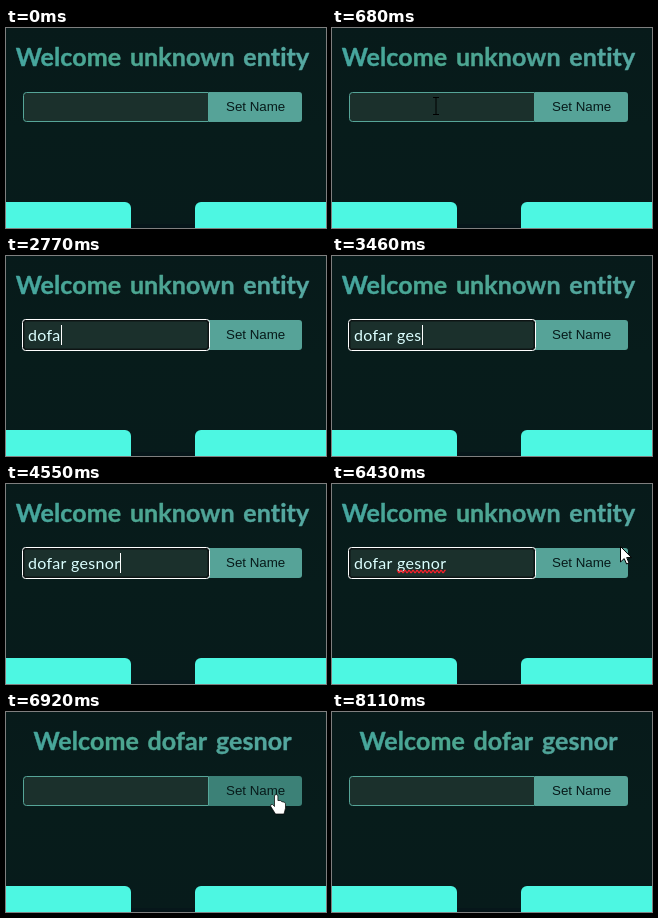
An HTML page with a canvas for the animation above (9.09 s loop, 320 by 200 pixels).

```html
<!DOCTYPE html>
<html lang="en">
<head>
<meta charset="utf-8">
<title>Set Name</title>
<style>
html, body { margin: 0; width: 100%; height: 100%; overflow: hidden; background: #071a1a; }
canvas { display: block; }
</style>
</head>
<body>
<canvas id="stage" width="320" height="200"></canvas>
<script>
const ctx = document.getElementById('stage').getContext('2d');
const LOOP = 9090;
const NAME = 'dofar gesnor';

const keyTimes = [1880, 2180, 2470, 2770, 2970, 3160, 3260, 3360, 3460, 4150, 4350, 4550];
const caretOff = [[1280, 1780], [3950, 4150], [5040, 5540], [6130, 6620]];
const FOCUS = 780, SPELLCHECK = 5540, HOVER = 6520, PRESS = 6820, SUBMIT = 6920, LEAVE = 8110;

// Pointer poses: start time, shape, hotspot x, y
const pointer = [
  [0, null],
  [190, 'arrow', 266, 115], [290, 'arrow', 226, 103], [390, 'beam', 178, 84],
  [490, 'arrow', 132, 48], [580, 'beam', 112, 70], [680, 'beam', 104, 78],
  [880, null],
  [6330, 'arrow', 299, 53], [6430, 'arrow', 288, 62], [6520, 'hand', 275, 76],
  [6620, 'hand', 270, 81], [6820, 'hand', 270, 82], [8010, 'hand', 271, 88],
  [8110, null]
];

const shapes = {
  arrow: new Path2D('M.5 .5V16L4.2 12.6 6.6 18 9 17 6.7 11.6H11.5Z'),
  hand: new Path2D('M-1.5 2q0-1.5 1.7-1.5t1.7 1.5v4.5q3-.5 4 1.2 3.2 0 3.6 2v4.5l-1.5 5.8h-8.5l-5-8q0-2 2-1.5l2 2z'),
  beam: new Path2D('M-3-8.5H3M0-8.5V8.5M-3 8.5H3')
};

const between = (t, from, to) => t >= from && t < to;

function gradient(x0, y0, x1, y1, colors) {
  const g = ctx.createLinearGradient(x0, y0, x1, y1);
  colors.forEach((c, i) => g.addColorStop(i / (colors.length - 1), c));
  return g;
}

function box(x, y, w, h, radii, fill, stroke, lineWidth = 1) {
  ctx.beginPath();
  ctx.roundRect(x, y, w, h, radii);
  if (fill) { ctx.fillStyle = fill; ctx.fill(); }
  if (stroke) { ctx.strokeStyle = stroke; ctx.lineWidth = lineWidth; ctx.stroke(); }
}

function setText(font, align, letter, word) {
  ctx.font = font;
  ctx.textAlign = align;
  ctx.letterSpacing = letter + 'px';
  ctx.wordSpacing = word + 'px';
}

function drawBackground() {
  ctx.fillStyle = gradient(0, 0, 0, 200, ['#071a1a', '#071c1b', '#071b1b']);
  ctx.fillRect(0, 0, 320, 200);
  ctx.fillStyle = '#06161a';
  ctx.fillRect(122, 196, 70, 4);
  box(-10, 174, 135, 40, 6, '#4df7e2');
  box(189, 174, 150, 40, 6, '#4df7e2');
}

function drawTitle(t) {
  const text = 'Welcome ' + (t >= SUBMIT ? NAME : 'unknown entity');
  setText('700 25px Lato, sans-serif', 'center', 0.1, 2.5);
  ctx.fillStyle = ctx.strokeStyle =
    gradient(10, 20, 302, 44, ['#45a6a0', '#4ba78f', '#4ea397', '#55a9a2']);
  ctx.lineWidth = 0.4;
  ctx.lineJoin = 'round';
  ctx.fillText(text, 156.5, 38);
  ctx.strokeText(text, 156.5, 38);
}

function drawSquiggle(from, to) {
  ctx.beginPath();
  for (let x = from; x <= to; x += 0.5) ctx.lineTo(x, 87.5 - 1.2 * Math.cos((x - from) * Math.PI / 2));
  ctx.strokeStyle = '#f0202a';
  ctx.lineWidth = 1.3;
  ctx.stroke();
}

function drawInput(t) {
  const focused = between(t, FOCUS, PRESS);
  box(17.5, 64.5, 185, 29, [3, 0, 0, 3], '#1b302c', '#56a598');
  if (focused) {
    box(17.5, 64.5, 185, 29, 3, null, '#0e1414', 2);
    box(16.5, 63.5, 187, 31, 3, null, '#fff');
  }
  if (t >= SUBMIT) return;

  const text = NAME.slice(0, keyTimes.filter(k => t >= k).length);
  setText('16px Lato, sans-serif', 'left', 0.3, 0);
  ctx.fillStyle = '#dcffff';
  ctx.fillText(text, 22, 85);
  const end = 22 + Math.round(ctx.measureText(text).width);
  if (t >= SPELLCHECK) drawSquiggle(22 + ctx.measureText(NAME.slice(0, 6)).width, end);
  if (focused && !caretOff.some(([from, to]) => between(t, from, to))) {
    ctx.fillStyle = '#fff';
    ctx.fillRect(end, 69, 1, 20);
  }
}

function drawButton(t) {
  box(203, 64, 93, 30, [0, 3, 3, 0], between(t, HOVER, LEAVE) ? '#3c8177' : '#56a398');
  setText('13.333px "Liberation Sans", Arial, sans-serif', 'left', 0, 0);
  ctx.fillStyle = '#071a1a';
  ctx.fillText('Set Name', 220, 83);
}

function drawPointer(t) {
  const [, kind, x, y] = pointer.findLast(p => t >= p[0]);
  if (!kind) return;
  ctx.save();
  ctx.translate(x, y);
  ctx.lineWidth = kind === 'hand' ? 0.7 : 1;
  ctx.lineJoin = 'round';
  ctx.strokeStyle = '#000';
  if (kind !== 'beam') {
    ctx.fillStyle = '#fff';
    ctx.fill(shapes[kind]);
  }
  ctx.stroke(shapes[kind]);
  ctx.restore();
}

function draw(t) {
  drawBackground();
  drawTitle(t);
  drawButton(t);
  drawInput(t);
  drawPointer(t);
}

const start = performance.now();
function frame() {
  draw((performance.now() - start) % LOOP);
  requestAnimationFrame(frame);
}
frame();
</script>
</body>
</html>
```
